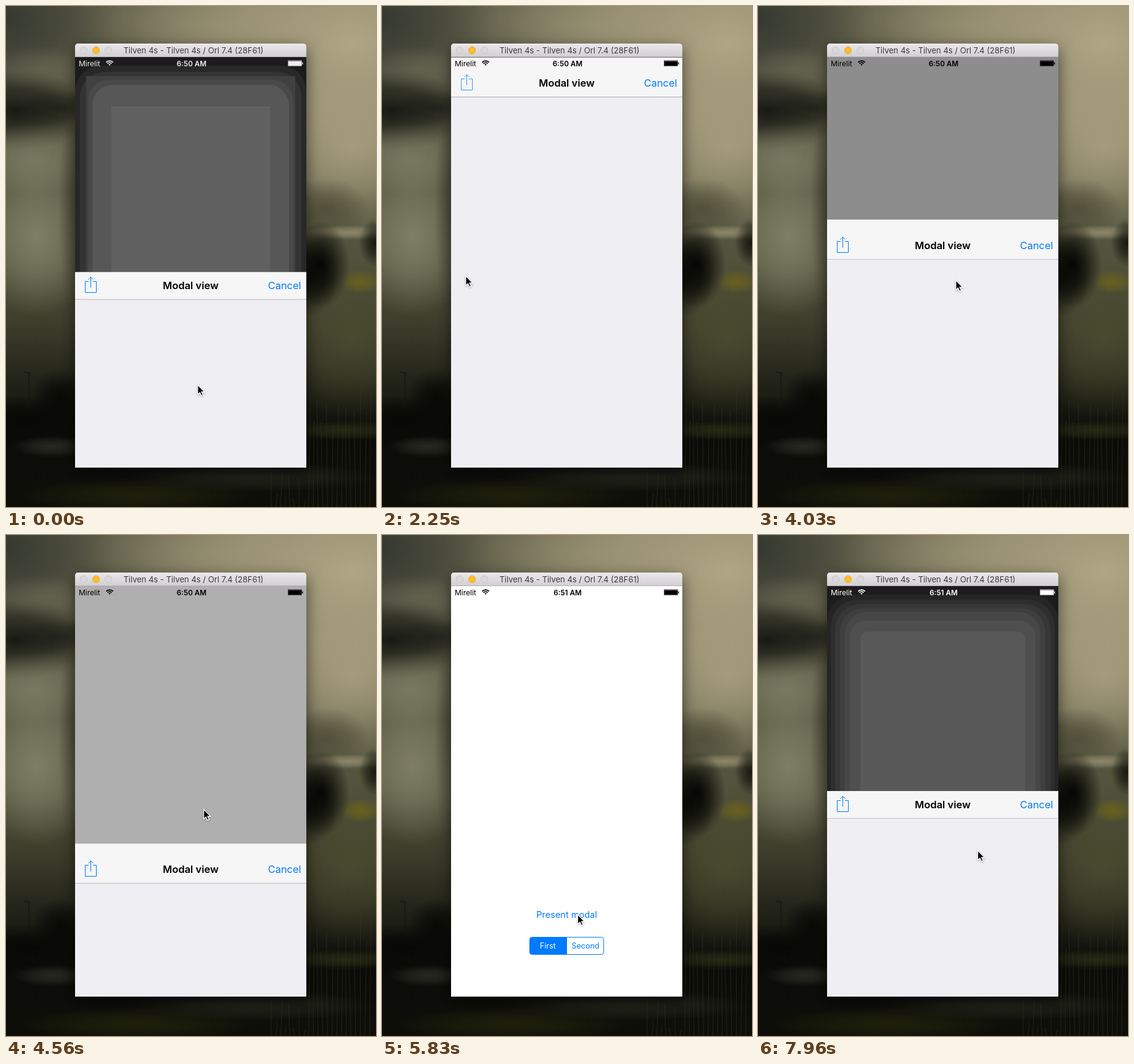
An HTML page with a canvas that plays this animation: 600 px wide and 814 px high, repeating every 8 s.

```html
<!DOCTYPE html>
<html>
<head>
<meta charset="utf-8">
<style>
html, body { margin: 0; width: 100%; height: 100%; overflow: hidden; background: #111; }
canvas { display: block; }
</style>
</head>
<body>
<canvas id="stage" width="600" height="814"></canvas>
<script>
const LOOP = 8000, LEFT = 112, TOP = 83, WIDTH = 375, HEIGHT = 667, MID = 299.5;
const RIGHT = LEFT + WIDTH, BOTTOM = TOP + HEIGHT;
const BLUE = '#007aff', FONT = 'Inter, "Liberation Sans", sans-serif';
const stage = document.getElementById('stage').getContext('2d');

const clamp = v => Math.max(0, Math.min(1, v));
const mix = (a, b, p) => a + (b - a) * p;
const span = (t, a, b) => clamp((t - a) / (b - a));
const grey = v => `rgb(${Math.round(v)},${Math.round(v)},${Math.round(v)})`;

const linear = p => p;
const sine = p => (1 - Math.cos(Math.PI * p)) / 2;
const cubic = p => p < .5 ? 4 * p ** 3 : 1 - 4 * (1 - p) ** 3;
const out = p => 1 - (1 - p) ** 2;

// Critically damped spring used whenever the sheet is presented.
function present(ms) {
  if (ms <= 0) return 0;
  if (ms > 720) return 1;
  const x = ms * .0129;
  return 1 - (1 + x) * Math.exp(-x);
}

// Keys are [time, values, easing of the segment that ends here].
function track(keys, t) {
  if (t <= keys[0][0]) return keys[0][1];
  for (let i = 1; i < keys.length; i++) {
    const [end, to, ease = sine] = keys[i], [start, from] = keys[i - 1];
    if (t < end) {
      const p = ease((t - start) / (end - start));
      return from.map((v, k) => mix(v, to[k], p));
    }
  }
  return keys[keys.length - 1][1];
}

const POINTER = [
  [0, [311, 616]], [650, [311, 616]], [1150, [136, 439]],
  [2400, [136, 439]], [2900, [326, 182]], [3150, [326, 182]],
  [3440, [324, 297], linear], [3940, [321, 446], out],
  [5220, [320.5, 446]], [5830, [317.5, 617]], [7250, [317.5, 617]],
  [7730, [349, 598]], [7780, [349, 598]], [7960, [356.5, 513], linear]
];

const SHEET_DRAG = [
  [3470, [83]], [3620, [215], linear], [3940, [341], out],
  [4030, [347], out], [4410, [347]], [4740, [750], cubic]
];

// Backdrop layers from outside in: [side inset, top inset, radius, grey].
const same = (n, layer) => Array(n).fill(layer);
const BACKDROP = [
  [0, same(7, [0, 0, 0, 255])],
  [.437, [[8, 15, 0, 177], ...same(6, [11, 24, 34, 180])]],
  [.952, [[0, 14, 42, 40], [8, 24, 40, 52], [18, 31, 0, 65], [21, 37, 34, 73],
    [28, 45, 34, 87], [28, 45, 34, 87], [59, 80, 0, 97]]],
  [1, [[0, 14, 44, 37], [6, 22, 44, 46], [13, 29, 42, 55], [21, 36, 38, 63],
    [29, 42, 36, 71], [37, 56, 26, 79], [54, 74, 12, 88]]]
];
const STATUS = [[0, [0]], [.437, [66], linear], [.952, [238], linear], [1, [255], linear]];

function box(c, x, y, w, h, r, fill) {
  c.beginPath();
  c.roundRect(x, y, w, h, r);
  c.fillStyle = fill;
  c.fill();
}

function path(c, points, close) {
  c.beginPath();
  points.forEach(([x, y], i) => i ? c.lineTo(x, y) : c.moveTo(x, y));
  if (close) c.closePath();
}

function text(c, str, x, y, size, color, align = 'center', weight = 400) {
  c.font = `${weight} ${size}px ${FONT}`;
  c.textAlign = align;
  c.fillStyle = color;
  c.fillText(str, x, y);
}

function blob(c, x, y, rx, ry, rgb, alpha) {
  c.save();
  c.translate(x, y);
  c.scale(rx, ry);
  const g = c.createRadialGradient(0, 0, 0, 0, 0, 1);
  g.addColorStop(0, `rgba(${rgb},${alpha})`);
  g.addColorStop(.5, `rgba(${rgb},${alpha * .6})`);
  g.addColorStop(1, `rgba(${rgb},0)`);
  c.fillStyle = g;
  c.fillRect(-1, -1, 2, 2);
  c.restore();
}

function paintLandscape(c) {
  const g = c.createLinearGradient(0, 0, 0, 814);
  [[0, '#67654f'], [.25, '#5b5a45'], [.5, '#53533d'], [.65, '#393a29'],
    [.77, '#1e1f15'], [.86, '#0b0c08'], [1, '#0e0f09']]
    .forEach(([p, color]) => g.addColorStop(p, color));
  c.fillStyle = g;
  c.fillRect(0, 0, 600, 814);
  const pale = '176,166,132', fog = '134,133,108', dark = '20,22,17', ink = '6,7,4', moss = '84,83,52';
  blob(c, 0, 20, 190, 150, '48,52,44', .9);
  blob(c, 560, 60, 360, 260, pale, 1);
  blob(c, 560, 230, 180, 150, pale, .75);
  blob(c, 330, 30, 200, 70, pale, .35);
  blob(c, 15, 170, 130, 65, dark, .95);
  blob(c, 90, 165, 70, 30, dark, .6);
  blob(c, 60, 100, 90, 35, fog, .35);
  blob(c, 45, 250, 110, 60, fog, .7);
  blob(c, 50, 375, 100, 130, fog, .85);
  blob(c, 110, 330, 25, 180, '66,67,50', .6);
  blob(c, 560, 540, 130, 130, moss, .65);
  blob(c, 520, 330, 70, 50, '70,69,48', .7);
  blob(c, 555, 368, 75, 12, pale, .6);
  blob(c, 575, 448, 35, 20, '112,102,24', .8);
  blob(c, 510, 420, 48, 70, ink, 1);
  blob(c, 490, 440, 50, 65, ink, .8);
  blob(c, 600, 385, 28, 40, ink, .8);
  blob(c, 88, 635, 48, 45, ink, .9);
  blob(c, 40, 670, 150, 38, ink, .9);
  blob(c, 75, 716, 65, 18, '52,54,44', .7);
  blob(c, 550, 690, 110, 16, '54,58,24', .6);
  blob(c, 400, 765, 200, 25, '52,54,40', .55);
  blob(c, 210, 795, 190, 28, '38,40,12', .7);
  path(c, [[30, 595], [37.5, 596], [37.5, 652]]);
  c.strokeStyle = '#15160f';
  c.lineWidth = 1.5;
  c.stroke();
  c.lineWidth = 1;
  c.strokeStyle = 'rgba(58,60,42,.45)';
  for (let i = 0; i < 22; i++) {
    const x = 430 + i * 7.6, top = (x > 488 ? 620 : 755) + (i * 37 % 70);
    path(c, [[x, 814], [x + 3 * Math.sin(i), top]]);
    c.stroke();
  }
}

function paintWindow(c) {
  c.save();
  c.shadowColor = 'rgba(0,0,0,.55)';
  c.shadowBlur = 24;
  c.shadowOffsetY = 8;
  box(c, LEFT, 61, WIDTH, BOTTOM - 61, [5, 5, 0, 0], '#ddd');
  c.restore();
  const bar = c.createLinearGradient(0, 61, 0, TOP);
  bar.addColorStop(0, '#ebe8eb');
  bar.addColorStop(1, '#d1cfd1');
  box(c, LEFT, 61, WIDTH, 22, [5, 5, 0, 0], bar);
  c.fillStyle = '#b4b2b4';
  c.fillRect(LEFT, 82, WIDTH, 1);
  [['#dad7da', '#c4c1c4'], ['#febe2f', '#e3a62b'], ['#dad7da', '#c4c1c4']].forEach(([fill, edge], i) => {
    c.beginPath();
    c.arc(126 + i * 20, 72, 5.7, 0, 7);
    c.fillStyle = fill;
    c.fill();
    c.strokeStyle = edge;
    c.lineWidth = .8;
    c.stroke();
  });
  text(c, 'Tilven 4s - Tilven 4s / Orl 7.4 (28F61)', 304, 77, 13, '#3c3b3c');
}

function drawHome(c, shade, tint) {
  box(c, LEFT, TOP, WIDTH, HEIGHT, 0, shade);
  drawControls(c, tint, shade);
}

function drawControls(c, tint, paper) {
  text(c, 'Present modal', MID, 622, 14.5, tint);
  c.save();
  c.beginPath();
  c.roundRect(239.5, 653.5, 120, 28, 4);
  c.strokeStyle = tint;
  c.lineWidth = 1;
  c.stroke();
  c.clip();
  c.fillStyle = tint;
  c.fillRect(239, 653, 61, 30);
  c.restore();
  text(c, 'First', 269, 671.5, 12.5, paper);
  text(c, 'Second', 330, 671.5, 12.5, tint);
}

function drawBackdrop(c, q) {
  box(c, LEFT, TOP, WIDTH, HEIGHT, 0, grey(28));
  let i = 1;
  while (i < BACKDROP.length - 1 && q > BACKDROP[i][0]) i++;
  const [q0, from] = BACKDROP[i - 1], [q1, to] = BACKDROP[i];
  const p = span(q, q0, q1);
  from.forEach((layer, k) => {
    const [x, y, r, v] = layer.map((n, j) => mix(n, to[k][j], p));
    box(c, LEFT + x, TOP + y, WIDTH - 2 * x, HEIGHT - y, [r, r, 0, 0], grey(v));
  });
  if (q < .6) {
    const s = 1 - .043 * q / .437;
    c.save();
    c.translate(MID, 416.5);
    c.scale(s, s);
    c.translate(-MID, -416.5);
    c.globalAlpha = 1 - q / .6;
    drawControls(c, q < .1 ? BLUE : '#6c6c6c', grey(mix(255, 180, clamp(q / .437))));
    c.restore();
  }
}

function drawStatus(c, color, time) {
  text(c, 'Mirelit', 118, 97.5, 12, color, 'left');
  text(c, time, 301, 97.5, 11.7, color, 'center', 600);
  c.strokeStyle = color;
  c.lineWidth = 1.8;
  [7.8, 4.8, 1.6].forEach(r => {
    c.beginPath();
    c.arc(168, 97, r, -2.36, -.78);
    c.stroke();
  });
  c.lineWidth = .6;
  c.strokeRect(457.3, 88.8, 22.4, 8.8);
  c.fillStyle = color;
  c.fillRect(458, 89.5, 21, 7.4);
  c.fillRect(480.3, 91.5, 1.2, 3.5);
}

function drawSheet(c, top, bar, shareAlpha) {
  const line = top + bar, mid = line - 22, y = Math.round(mid) + .5;
  box(c, LEFT, top, WIDTH, bar, 0, '#f6f6f6');
  box(c, LEFT, line, WIDTH, BOTTOM, 0, '#eeeef3');
  box(c, LEFT, line, WIDTH, 1, 0, '#c3c3c6');
  text(c, 'Modal view', MID, mid + 6, 16.4, '#000', 'center', 600);
  text(c, 'Cancel', 478.5, mid + 6, 16.4, BLUE, 'right');
  c.save();
  c.globalAlpha = shareAlpha;
  c.strokeStyle = BLUE;
  c.lineWidth = 1;
  path(c, [[134, y - 7], [128.5, y - 7], [128.5, y + 11], [146.5, y + 11], [146.5, y - 7], [141, y - 7]]);
  c.stroke();
  path(c, [[137.5, y + 3], [137.5, y - 14]]);
  c.stroke();
  path(c, [[133.5, y - 10], [137.5, y - 14], [141.5, y - 10]]);
  c.stroke();
  c.restore();
}

function drawPointer(c, [x, y]) {
  c.save();
  c.translate(x, y);
  c.shadowColor = 'rgba(0,0,0,.35)';
  c.shadowBlur = 3;
  c.shadowOffsetY = 1;
  path(c, [[0, 0], [0, 15.2], [3.4, 12.1], [6, 17.6], [8.6, 16.4], [6.2, 11.2], [10.8, 11.2]], true);
  c.fillStyle = c.strokeStyle = '#fff';
  c.lineWidth = 1.4;
  c.stroke();
  c.shadowColor = 'transparent';
  path(c, [[.5, 1.2], [.5, 13.8], [3.6, 11], [6.3, 16.6], [7.6, 16], [5.1, 10.3], [9.3, 10.3]], true);
  c.fillStyle = '#000';
  c.fill();
  c.restore();
}

function draw(c, t) {
  const time = t < 5520 ? '6:50 AM' : '6:51 AM';
  let q = 1, top = BOTTOM, bar = 64, ink = '#000';
  c.drawImage(scenery, 0, 0);
  c.save();
  c.beginPath();
  c.rect(LEFT, TOP, WIDTH, HEIGHT);
  c.clip();
  if (t < 3470 || t >= 7000) {
    if (t >= 1610 && t < 7000) {
      top = mix(396, TOP, cubic(span(t, 1610, 2300)));
    } else {
      q = present(t < 7000 ? t + 370 : t - 7065);
      top = mix(BOTTOM, 416, q);
      bar = 44;
    }
    drawBackdrop(c, q);
    if (top > 98) ink = grey(track(STATUS, q)[0]);
  } else {
    top = track(SHEET_DRAG, t)[0];
    const dim = t < 4410 ? .447 * (BOTTOM - top) / 403 : .447 * (1 - sine(span(t, 4410, 4820)));
    drawHome(c, grey(255 * (1 - dim)), dim > .2 ? '#5d5d5d' : BLUE);
  }
  const shareAlpha = t < 1590 || t > 2450 ? 1 : mix(.2, 1, span(t, 1800, 2450));
  if (top < BOTTOM) drawSheet(c, top, bar, shareAlpha);
  drawStatus(c, ink, time);
  c.restore();
  drawPointer(c, track(POINTER, t));
}

const scenery = document.createElement('canvas');
scenery.width = 600;
scenery.height = 814;
paintLandscape(scenery.getContext('2d'));
paintWindow(scenery.getContext('2d'));

const begin = performance.now();
function tick() {
  draw(stage, (performance.now() - begin) % LOOP);
  requestAnimationFrame(tick);
}
tick();
</script>
</body>
</html>
```
